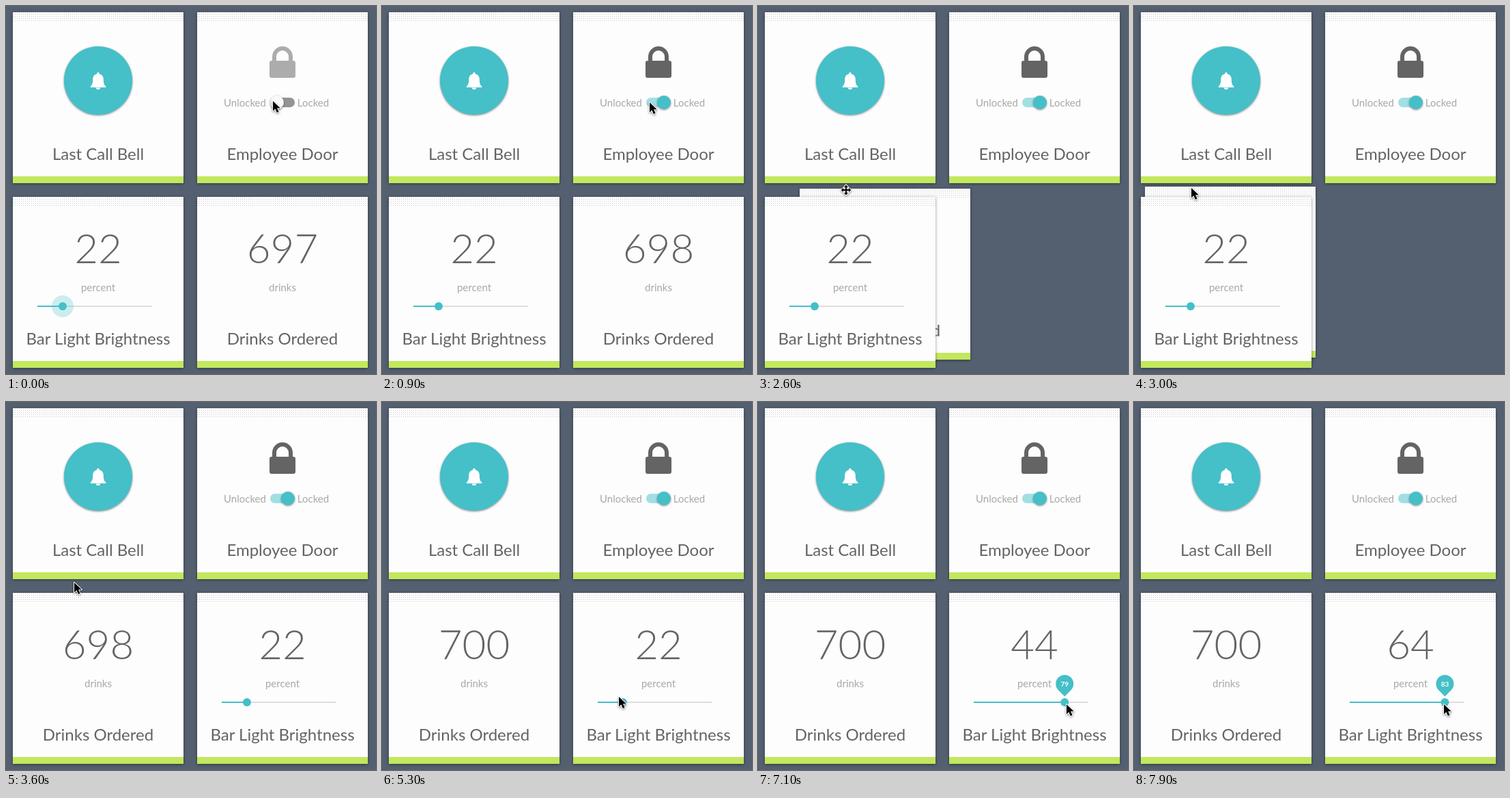
An HTML page for the animation above (8 s loop, 542x538 px).

```html
<!DOCTYPE html>
<html lang="en">
<head>
<meta charset="utf-8">
<title>Bar dashboard</title>
<style>
  html, body { margin: 0; width: 100%; height: 100%; overflow: hidden; background: #546070; }
  svg { display: block; width: 542px; height: 538px; }
  text { font-family: Lato, sans-serif; text-anchor: middle; fill: #646464; }
  .title { font-size: 24px; }
  .number { font-size: 60px; font-weight: 300; }
  .label { font-size: 15px; fill: #a8a8a8; }
  .pin-text { font-size: 10px; font-weight: 700; fill: #fff; }
  .card { filter: drop-shadow(0 1px 2px rgba(0, 0, 0, .42)); }
  .raised { filter: drop-shadow(0 1px 1.5px rgba(0, 0, 0, .45)); }
  .teal { fill: #45bfc8; }
</style>
</head>
<body>
<svg viewBox="0 0 542 538">
  <defs>
    <pattern id="dots" width="3" height="3" patternUnits="userSpaceOnUse">
      <rect width="1" height="1" fill="#ccc"/>
    </pattern>
    <g id="panel">
      <rect class="card" width="250" height="250" fill="#fdfdfd"/>
      <rect width="250" height="14" fill="url(#dots)"/>
      <rect y="240" width="250" height="10" fill="#c3e75d"/>
    </g>
  </defs>

  <g transform="translate(10 9)">
    <use href="#panel"/>
    <circle class="teal raised" cx="125" cy="100" r="50"/>
    <path fill="#fff" d="M125 88c1 0 1.700.7 1.700 1.700v.6c4 .9 6.100 4 6.100 8 0 6 1.200 8.300 3.500 10.200v1.500h-22.600v-1.500c2.300-1.900 3.500-4.200 3.500-10.200 0-4 2.100-7.100 6.100-8v-.6c0-1 .7-1.700 1.700-1.700zM121.800 110.500h6.400a3.200 2.600 0 0 1-6.400 0z"/>
    <text class="title" x="125" y="216">Last Call Bell</text>
  </g>

  <g transform="translate(280 9)">
    <use href="#panel"/>
    <g id="lock">
      <rect x="106" y="71" width="38" height="25" rx="3"/>
      <path fill="none" stroke-width="6" d="M113 73V65a12 12 0 0 1 24 0V73"/>
    </g>
    <text class="label" x="70" y="138">Unlocked</text>
    <text class="label" x="170" y="138">Locked</text>
    <rect id="track" x="107" y="125" width="36" height="14" rx="7"/>
    <circle id="switch" class="raised" cy="132" r="10"/>
    <text class="title" x="125" y="216">Employee Door</text>
  </g>

  <g id="drinks">
    <use href="#panel"/>
    <text id="count" class="number" x="125" y="97"></text>
    <text class="label" x="125" y="138">drinks</text>
    <text class="title" x="125" y="216">Drinks Ordered</text>
  </g>

  <g id="light">
    <use href="#panel"/>
    <text id="percent" class="number" x="125" y="97"></text>
    <text class="label" x="125" y="138">percent</text>
    <rect x="36" y="159" width="168" height="2" fill="#dedede"/>
    <rect id="level" class="teal" x="36" y="159" height="2"/>
    <g id="knob">
      <circle id="ring" class="teal" r="16"/>
      <circle class="teal" r="6"/>
      <g id="pin">
        <path class="teal" d="M0-8.600L-9.200-17.800A13 13 0 1 1 9.200-17.800z"/>
        <text id="value" class="pin-text" y="-23"></text>
      </g>
    </g>
    <text class="title" x="125" y="216">Bar Light Brightness</text>
  </g>

  <g id="cursor" stroke="#fff" stroke-linejoin="round" paint-order="stroke" stroke-width="2" class="raised">
    <path id="arrow" d="M0 0V14.500l3.400-3.200 2.500 5.700 2.700-1.200-2.500-5.500h4.700z"/>
    <path id="move" d="M0-7.500l3 3.500h-2v3h3v-2l3.500 3-3.500 3v-2h-3v3h2l-3 3.500-3-3.500h2v-3h-3v2l-3.500-3 3.500-3v2h3v-3h-2z"/>
  </g>
</svg>

<script>
const LOOP = 8000, STEP = 100;
const GRAB = 2200, DROP = 3000, SETTLED = 3400;
const el = id => document.getElementById(id);
const set = (id, attrs) => {
  for (const name in attrs) el(id).setAttribute(name, attrs[name]);
};
const place = (id, x, y) => set(id, { transform: `translate(${x} ${y})` });
const progress = (t, start, end) => Math.min(1, Math.max(0, (t - start) / (end - start)));
const smooth = p => p * p * (3 - 2 * p);
const mix = (a, b, p) => a + (b - a) * p;
const gray = v => `rgb(${v},${v},${v})`;

// Each key is [time, ...values]; movement eases between neighbours.
function follow(keys, t, ease = smooth) {
  const i = keys.findIndex(key => key[0] > t);
  if (i < 0) return keys[keys.length - 1].slice(1);
  if (i === 0) return keys[0].slice(1);
  const [from, to] = [keys[i - 1], keys[i]];
  const p = ease(progress(t, from[0], to[0]));
  return from.slice(1).map((v, k) => mix(v, to[k + 1], p));
}

const pointerPath = [
  [0, 391, 139], [300, 392, 141], [1200, 392, 141], [2100, 348, 281], [2300, 348, 281],
  [2600, 129, 269], [2800, 84, 266], [3000, 84, 266], [3300, 100, 264], [3700, 100, 264],
  [4900, 340, 428], [5200, 347, 431], [5700, 347, 431], [6500, 416, 442], [7200, 454, 442]
];
const sliderPath = [[5700, 22], [6500, 57], [7200, 83]];

function drawDoor(t) {
  const on = smooth(progress(t, 400, 700));
  const shade = gray(Math.round(mix(172, 100, on)));
  set('lock', { fill: shade, stroke: shade });
  el('lock').firstElementChild.setAttribute('stroke', 'none');
  set('switch', { cx: mix(117, 133, on), fill: on > .3 ? '#45bfc8' : '#fafafa' });
  set('track', { fill: on > .3 ? '#a1dfe3' : '#949494' });
}

function drawCards(t) {
  const [x, y] = follow(pointerPath, Math.min(t, DROP));
  const settle = smooth(progress(t, DROP, SETTLED));
  const held = t < GRAB ? [280, 279] : [x - 68, y - 2];
  place('drinks', mix(held[0], 10, settle), mix(held[1], 279, settle));
  place('light', mix(10, 280, settle), 279);
  el('count').textContent = 697 + [600, 4500, 5100].filter(time => t >= time).length;
}

function drawSlider(t) {
  const [value] = follow(sliderPath, t, p => p);
  const x = 168 * value / 100;
  set('level', { width: x });
  place('knob', 36 + x, 160);
  set('ring', { opacity: .27 * (1 - progress(t, 300, 600)) });
  set('pin', { transform: `scale(${progress(t, 5600, 5800)})` });
  el('value').textContent = Math.round(value);
  // The readout trails the knob at a steady rate.
  el('percent').textContent = Math.round(22 + Math.max(0, t - 6220) / 40);
}

function drawCursor(t) {
  const [x, y] = follow(pointerPath, t);
  const moving = (t >= GRAB && t < DROP) || (y >= 279 && y < 293);
  place('cursor', x, y);
  set('arrow', { visibility: moving ? 'hidden' : 'visible' });
  set('move', { visibility: moving ? 'visible' : 'hidden' });
}

function frame() {
  const t = Math.floor(performance.now() % LOOP / STEP) * STEP;
  drawDoor(t);
  drawCards(t);
  drawSlider(t);
  drawCursor(t);
  requestAnimationFrame(frame);
}
frame();
</script>
</body>
</html>
```
